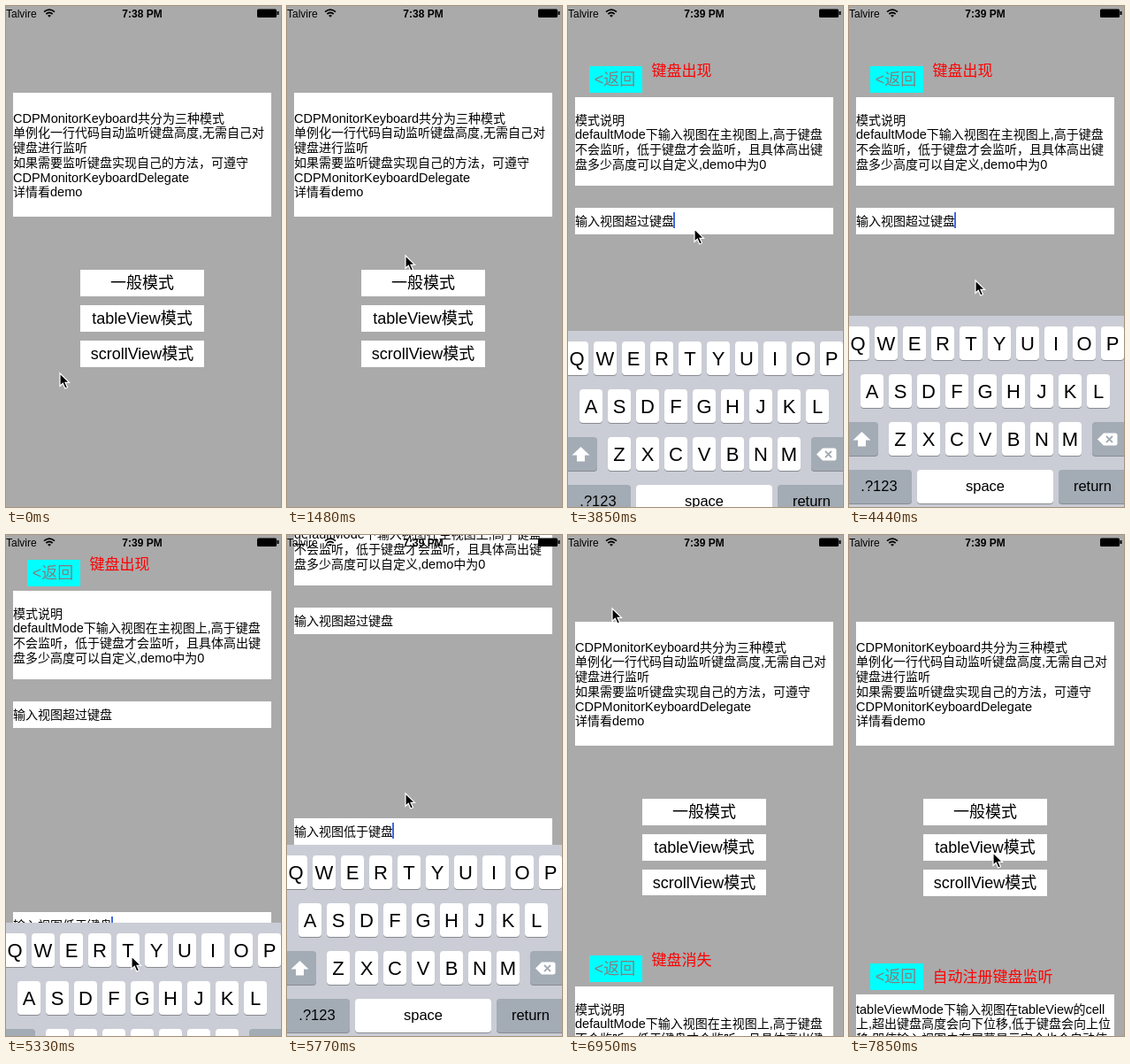
These frames come from a looping animation (311 by 566 pixels, 8000 ms). An HTML page:

```html
<!DOCTYPE html>
<html lang="zh">
<head>
<meta charset="utf-8">
<style>
html, body { margin: 0; width: 100%; height: 100%; overflow: hidden; background: #aaa; }
svg { display: block; }
text { font-family: "Liberation Sans", "Noto Sans CJK SC", "Noto Sans CJK", sans-serif; font-weight: 300; white-space: pre; }
</style>
</head>
<body>
<svg id="stage" width="311" height="566" viewBox="0 0 311 566"></svg>
<script>
const LOOP = 8000, STEP = 148.2, FIRST = 290, H = 566, KB = 216, LIFT = 146;

const rect = (x, y, w, h, fill = '#fff', more = '') =>
  `<rect x="${x}" y="${y}" width="${w}" height="${h}" fill="${fill}" ${more}/>`;

// Latin runs are set slightly larger than the Chinese in body text.
const text = (x, y, s, size = 14, more = '') => {
  const body = size === 14 ? s.replace(/[!-~]+/g, m => `<tspan font-size="14.5">${m}</tspan>`) : s;
  return `<text x="${x}" y="${y}" font-size="${size}" ${more}>${body}</text>`;
};
const mid = (x, y, s, size, more = '') => text(x, y, s, size, 'text-anchor="middle" ' + more);
const lines = (y, list) => list.map((s, i) => text(8, y + i * 16.7, s)).join('');
const group = (id, body) => `<g id="${id}">${body}</g>`;

const backdrop = rect(0, 0, 311, 720, '#aaa');
const back = rect(24, 68, 60, 30, '#0ff') + mid(53, 89, '&lt;返回', 18, 'fill="#808080"');

const home = rect(8, 98, 292, 140) + lines(131.7, [
  'CDPMonitorKeyboard共分为三种模式',
  '单例化一行代码自动监听键盘高度,无需自己对',
  '键盘进行监听',
  '如果需要监听键盘实现自己的方法，可遵守',
  'CDPMonitorKeyboardDelegate',
  '详情看demo'
]) + ['一般模式', 'tableView模式', 'scrollView模式'].map((s, i) =>
  rect(84, 298 + 40 * i, 140, 30) + mid(154, 319 + 40 * i, s, 18)).join('');

const field = (y, s, id) => rect(8, y, 292, 30) + text(8, y + 19.7, s) +
  rect(119, y + 5, 2, 18, '#4169e1', `id="${id}"`);

const basicPage = backdrop + back + text(94.5, 79, '', 17, 'id="notice" fill="#f00"') +
  rect(8, 103, 292, 100) + lines(133.7, [
    '模式说明',
    'defaultMode下输入视图在主视图上,高于键盘',
    '不会监听，低于键盘才会监听，且具体高出键',
    '盘多少高度可以自定义,demo中为0'
  ]) + field(228, '输入视图超过键盘', 'caretHigh') + field(466, '输入视图低于键盘', 'caretLow');

const tablePage = backdrop + back + text(94.5, 89, '自动注册键盘监听', 17, 'fill="#f00"') +
  rect(8, 103, 292, 130) + lines(124.7, [
    'tableViewMode下输入视图在tableView的cell',
    '上,超出键盘高度会向下位移,低于键盘会向上位',
    '移,即使输入视图未在屏幕显示完全也会自动使'
  ]);

const key = (x, y, w, label = '', size = 22, fill = '#fff') =>
  rect(x, y + 1, w, 38, '#888b90', 'rx="4"') + rect(x, y, w, 38, fill, 'rx="4"') +
  mid(x + w / 2, y + (size === 22 ? 27 : 23.5), label, size);
const row = (letters, x, y) => [...letters].map((c, i) => key(x + 32 * i, y, 26, c)).join('');
const DARK = '#a3abb5';

const keyboard = rect(0, 0, 311, KB, '#cacdd5') +
  row('QWERTYUIOP', -3, 12) + row('ASDFGHJKL', 13, 66) + row('ZXCVBNM', 45, 120) +
  key(-3, 120, 36, '', 22, DARK) + key(275, 120, 39, '', 22, DARK) +
  '<path d="M14.500 131l10 9.500h-5.500v7h-9v-7h-5.500z" fill="#fff"/>' +
  '<path d="M281 139.500l7-7h13q2.500 0 2.500 2.500v9q0 2.500-2.500 2.500h-13z" fill="#fff"/>' +
  `<path d="M291 136l7 7m0-7l-7 7" stroke="${DARK}" stroke-width="1.800"/>` +
  key(-3, 174, 74, '.?123', 16.5, DARK) + key(77, 174, 154, 'space', 16.5) +
  key(237, 174, 77, 'return', 16.5, DARK);

const status = text(0, 12.5, 'Talvire', 12) + mid(154, 12.5, '7:38 PM', 12, 'id="clock" style="font-weight:bold"') +
  '<path d="M43 6.600q6-5 12 0M45.300 9q3.700-3 7.400 0" fill="none" stroke="#000" stroke-width="1.700"/>' +
  '<path d="M47 10.700q2-1.600 4 0l-2 2z"/>' +
  rect(284, 3.5, 22, 9.5, '#000', 'rx="1.500"') + rect(306.5, 6, 2, 4, '#000');

const pointer = '<path d="M0 0v14.300l3.300-3 2.500 5.700 2.700-1.200-2.500-5.500h4.500z" stroke="#fff" stroke-width="1.200"/>';

document.getElementById('stage').innerHTML = home + group('basic', basicPage) + group('table', tablePage) +
  group('keys', keyboard) + status + group('mouse', pointer);

const el = id => document.getElementById(id);
const [basic, table, keys, mouse, notice, clock, caretHigh, caretLow] =
  ['basic', 'table', 'keys', 'mouse', 'notice', 'clock', 'caretHigh', 'caretLow'].map(el);

// Pointer path: step, x, y
const path = [
  [-1, 61, 415], [0, 66, 385], [1, 94, 300], [2, 135, 282], [4, 135, 282], [6, 135, 220], [7, 135, 220],
  [8, 134, 282], [9, 134, 305], [10, 136, 320], [11, 138, 306], [16, 138, 306], [20, 143, 252],
  [25, 143, 252], [28, 143, 310], [29, 143, 310], [30, 142, 455], [32, 142, 476], [36, 142, 476],
  [38, 125, 108], [41, 125, 108], [43, 50, 83], [45, 50, 83], [47, 160, 364], [49, 163, 359], [60, 163, 359]
];
const SHOW1 = 3567, HIDE1 = 4610, SHOW2 = 5196, HIDE2 = 5915;

// Critically damped approach from 0 to 1
function settle(t, start) {
  const u = Math.max(0, t - start) * 0.015, rest = (1 + u) * Math.exp(-u);
  return rest < 0.004 ? 1 : 1 - rest;
}

function pointerAt(k) {
  const i = Math.max(1, path.findIndex(p => p[0] >= k));
  const [a, b] = [path[i - 1], path[i]];
  const f = Math.max(0, (k - a[0]) / (b[0] - a[0]));
  return [a[1] + (b[1] - a[1]) * f, a[2] + (b[2] - a[2]) * f];
}

const move = (node, x, y) => node.setAttribute('transform', `translate(${Math.round(x)} ${Math.round(y)})`);
const show = (node, on) => node.setAttribute('visibility', on ? 'visible' : 'hidden');
const put = (node, s) => { if (node.textContent !== s) node.textContent = s; };

function draw(now) {
  const k = Math.floor((now % LOOP - FIRST) / STEP + 0.12);
  const t = FIRST + k * STEP;
  const go = start => settle(t, start);
  const first = t >= SHOW1 && t < HIDE1, second = t >= SHOW2 && t < HIDE2;

  move(basic, 0, H * (1 - go(2100) + go(6790)) - LIFT * (go(5260) - go(HIDE2)));
  move(table, 0, H * (1 - go(7781.5)));
  move(keys, 0, H - KB * (go(SHOW1) - go(HIDE1) + go(SHOW2) - go(HIDE2)));
  move(mouse, ...pointerAt(k));
  put(notice, t < SHOW1 ? '自动注册键盘监听' : first || second ? '键盘出现' : '键盘消失');
  put(clock, t < 2200 ? '7:38 PM' : '7:39 PM');
  show(caretHigh, first);
  show(caretLow, second);
  requestAnimationFrame(draw);
}
draw(0);
</script>
</body>
</html>
```
